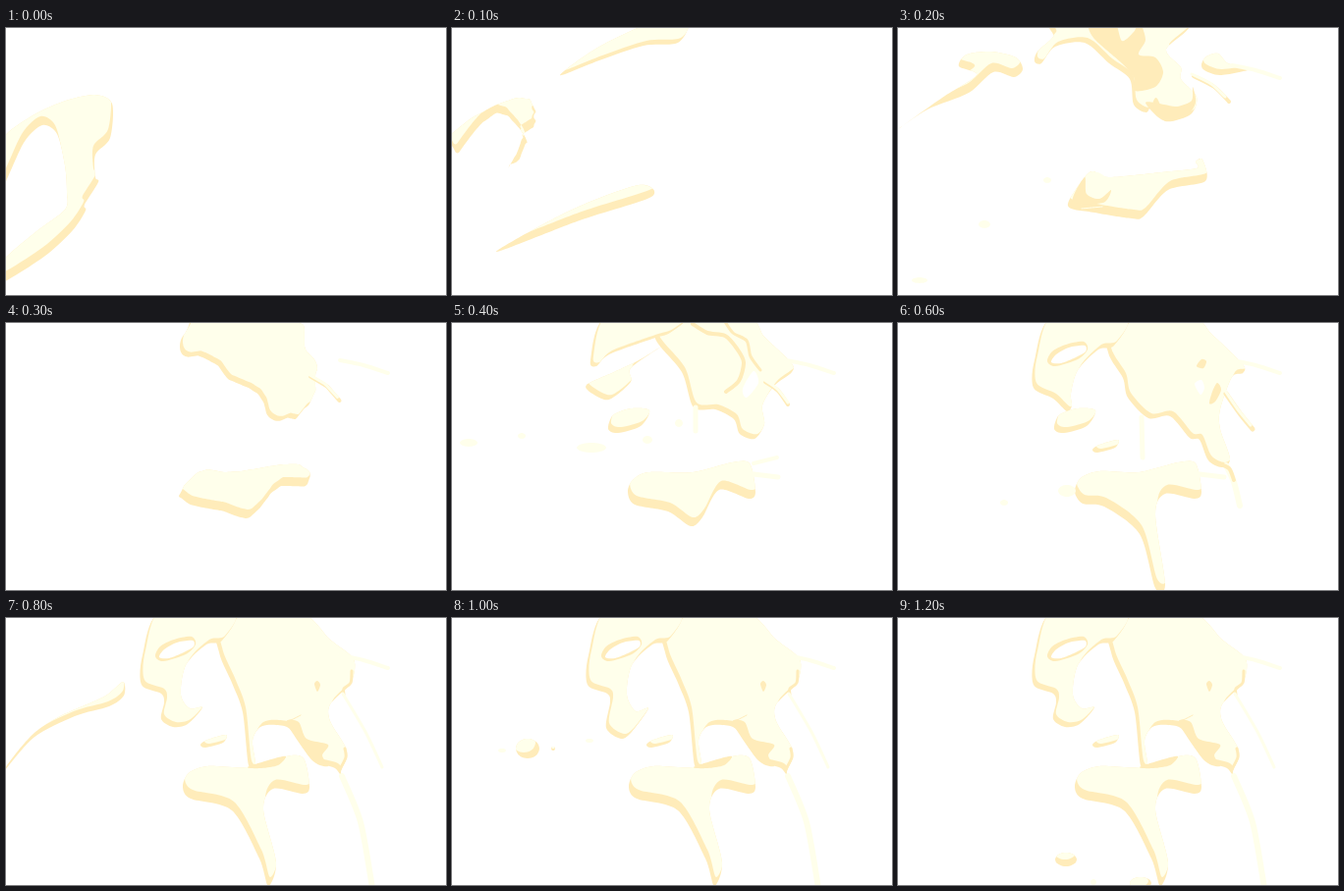
Write an HTML page that moves like this. It is 448 px wide and 272 px high and loops after 1300 ms.

```html
<!DOCTYPE html>
<html lang="en">
<head>
<meta charset="utf-8">
<title>Splash</title>
<style>
html, body { margin: 0; width: 100%; height: 100%; overflow: hidden; background: #fff; }
svg { display: block; width: 448px; height: 272px; }
</style>
</head>
<body>
<svg id="stage" viewBox="0 0 448 272"></svg>
<script>
const LOOP = 1300, STEP = 100, SAMPLES = 80;
const CREAM = "#ffffeb", SHADE = "#ffecba", WHITE = "#fff";
const parts = [];

// shift: cream laid over a shaded copy; width: an open line instead of a filled outline.
class Part {
  constructor(options) {
    Object.assign(this, { color: CREAM, until: LOOP, keys: [] }, options);
    parts.push(this);
  }
  pose(t, text) {
    const n = text.split(" ").map(Number);
    this.keys.push({ t, points: n.flatMap((x, i) => i % 2 ? [] : [[x, n[i + 1]]]) });
    return this;
  }
}
const liquid = (shift, until) => new Part({ shift, until: until || LOOP });
const patch = (color, until) => new Part({ color, until: until || LOOP });
const strand = (color, width, until) => new Part({ color, width, until: until || LOOP });

function drop(t, x, y, rx, ry, shift) {
  const ring = Array.from({ length: 10 }, (_, i) => i * Math.PI / 5)
    .map(a => `${x + rx * Math.cos(a)} ${y + ry * Math.sin(a)}`).join(" ");
  new Part({ until: t + STEP, shift }).pose(t, ring);
}

// First wave
liquid([-2, -9], 300)
  .pose(0, "-6 117 24 91 58 75 90 68 108 77 106 112 91 129 91 152 94 157 80 180 81 186 68 206 40 232 -6 260 -6 240 30 208 60 185 62 167 60 140 52 108 37 99 18 117 -6 166")
  .pose(200, "-4 106 45 71 80 48 62 39 70 27 95 24 120 30 127 42 118 50 97 45 72 66 30 83");

// Forehead, nose and right side
liquid([3, -5])
  .pose(100, "110 48 150 19 205 -6 240 -6 230 15 195 18 150 33")
  .pose(200, "163 -6 158 9 142 24 139 34 146 36 160 19 190 15 215 36 236 52 240 78 253 86 260 76 272 95 298 88 304 70 288 52 288 40 273 22 293 -6")
  .pose(400, "215 -6 207 16 234 50 246 86 268 88 287 98 293 113 308 118 318 103 316 84 328 64 346 50 345 40 318 14 300 -6")
  .pose(600, "215 -6 214 30 229 56 234 76 255 97 277 95 297 117 307 119 316 140 330 147 338 138 328 108 328 88 340 55 351 51 351 42 320 12 298 -6")
  .pose(800, "215 -6 217 35 230 66 241 96 247 150 254 149 251 125 259 111 275 109 290 114 312 145 335 153 345 168 341 157 347 142 345 130 330 105 330 88 351 66 354 42 330 22 298 -6");
patch(SHADE, 300).pose(200, "195 -6 199 10 228 36 240 50 241 64 262 60 270 45 262 30 245 27 252 12 246 -6 240 4 228 13 220 -6");
patch(SHADE, 300).pose(200, "270 94 293 90 303 76 300 60 299 74 284 80 271 78 252 76");
strand(SHADE, 4, 600).pose(400, "245 1 260 10 278 13 290 26 297 40 292 59 279 70");
strand(SHADE, 3, 600).pose(400, "277 -3 286 10 300 18 304 34 314 48");
patch(WHITE, 600).pose(400, "296 67 307 49 312 61 300 76");
patch(SHADE, 700).pose(600, "304 44 309 37 314 39 311 46");
patch(WHITE, 700).pose(600, "302 62 309 58 312 66 308 73");
patch(SHADE)
  .pose(600, "320 70 325 61 329 68 323 80 317 82")
  .pose(800, "314 67 317 64 320 68 317 75");
patch(SHADE).pose(800, "286 107 298 106 306 123 328 129 322 140 328 151 312 145");
strand(SHADE, 1).pose(800, "280 107 290 104 300 99");
strand(SHADE, 3).pose(800, "344 78 344 72 351 66 352 54");
strand(SHADE, 3).pose(800, "345 133 346 142 340 154");

// Eyelid and cheek
liquid([3, -4]).pose(400, "157 -6 141 38 147 44 160 32 204 16 222 10 235 -6");
liquid([3, -5])
  .pose(400, "137 63 165 50 190 38 213 24 182 46 182 60 160 78 143 72")
  .pose(600, "157 -6 139 38 138 66 158 77 172 90 177 84 176 72 183 48 204 27 220 23 232 -6")
  .pose(800, "157 -6 139 38 138 68 158 77 161 86 158 103 170 111 185 108 200 91 187 92 178 78 183 48 204 27 220 23 232 -6")
  .pose(1000, "157 -6 139 38 138 68 158 77 161 86 157 112 172 123 183 116 200 92 187 95 178 78 183 48 204 27 220 23 232 -6")
  .pose(1200, "157 -6 139 38 138 68 158 77 161 86 158 103 170 111 185 108 200 91 187 92 178 78 183 48 204 27 220 23 232 -6");
patch(SHADE).pose(600, "152 39 157 29 171 22 189 19 193 27 183 37 160 44");
patch(WHITE).pose(600, "156 40 161 32 174 25 190 23 191 29 181 35 166 41");
liquid([3, -6], 800).pose(400, "159 108 164 94 182 87 201 89 192 105 169 112");
liquid([4, -4]).pose(600, "198 129 205 124 224 119 221 127 203 132");

// Right brow and thin strands
liquid([2, -6], 300).pose(200, "309 37 314 29 326 26 336 36 358 42 328 48 312 43");
strand(CREAM, 4).pose(200, "340 38 364 43 389 51");
strand(SHADE, 4, 600).pose(200, "301 49 322 60 337 75").pose(400, "319 60 332 69 342 83");
strand(CREAM, 3, 600).pose(200, "299 47 319 57 333 70").pose(400, "318 58 331 67 342 81");
strand(SHADE, 5, 700).pose(600, "334 72 348 92 361 108");
strand(CREAM, 3).pose(600, "333 69 346 88 359 104").pose(800, "343 77 366 116 383 152");
strand(CREAM, 5, 700).pose(400, "248 86 248 110").pose(600, "248 96 249 137");
strand(CREAM, 6).pose(600, "334 145 342 162 348 186").pose(800, "342 161 361 208 373 275");
strand(SHADE, 4, 700).pose(600, "325 143 337 148 342 160");

// Lips
liquid([2, -9])
  .pose(100, "45 228 120 186 190 160 203 172 130 196")
  .pose(200, "173 181 190 152 199 146 215 152 268 147 304 143 303 136 310 134 313 156 275 165 250 192 238 194 200 188")
  .pose(400, "179 172 184 160 200 152 245 152 285 142 303 143 309 172 302 179 272 170 255 198 243 207 220 192 186 185")
  .pose(600, "180 172 186 158 205 151 245 152 285 142 303 143 309 172 302 179 272 174 262 195 272 266 262 270 246 215 210 187 188 184")
  .pose(800, "180 172 186 158 205 151 245 152 285 141 303 143 309 172 302 179 272 174 262 195 275 249 267 273 258 245 230 196 188 184");
patch(SHADE, 300).pose(200, "178 177 190 152 192 169 205 174 217 165 209 178");
patch(CREAM, 300).pose(200, "197 152 203 147 215 155 214 166 205 172 196 164");
strand(CREAM, 1, 300).pose(200, "187 184 208 182");
patch(SHADE).pose(800, "246 152 270 144 285 141 277 150 260 153");
strand(CREAM, 4, 600).pose(400, "307 143 331 137");
strand(CREAM, 5, 700).pose(400, "307 154 332 157");

// Second wave
liquid([-1, -5], 1000)
  .pose(700, "-6 160 18 126 45 104 46 114 14 143")
  .pose(800, "-6 161 10 138 30 116 55 100 100 80 119 65 120 79 105 90 70 100 28 122")
  .pose(900, "25 138 75 108 148 83 146 96 104 110 45 142");

// Flying drops
drop(200, 152, 155, 4, 3);
drop(200, 88, 200, 6, 4);
drop(200, 22, 257, 8, 3);
drop(400, 17, 122, 9, 4);
drop(400, 71, 115, 4, 3);
drop(400, 142, 127, 15, 5);
drop(400, 199, 119, 5, 4);
drop(400, 231, 102, 4, 4);
drop(600, 108, 183, 4, 3);
drop(600, 172, 171, 9, 6);
drop(1000, 51, 135, 4, 2);
drop(1000, 77, 133, 12, 10, [-4, -6]);
drop(1000, 103, 133, 2, 2, [0, -2]);
drop(1000, 140, 125, 4, 2);
drop(1100, 128, 190, 11, 8, [-2, -6]);
drop(1200, 171, 246, 11, 7, [-1, -7]);
drop(1200, 199, 269, 3, 3);
drop(1200, 247, 270, 11, 6, [-3, -2]);

const mix = (a, b, k) => a + (b - a) * k;

// Evenly spaced points let outlines with different point counts blend.
function resample(points, closed) {
  const ring = closed ? [...points, points[0]] : points;
  const lengths = ring.slice(1).map((p, i) => Math.hypot(p[0] - ring[i][0], p[1] - ring[i][1]));
  const total = lengths.reduce((a, b) => a + b, 0);
  let seg = 0, passed = 0;
  return Array.from({ length: SAMPLES }, (_, i) => {
    const goal = total * i / (closed ? SAMPLES : SAMPLES - 1);
    while (seg < lengths.length - 1 && passed + lengths[seg] < goal) passed += lengths[seg++];
    const k = (goal - passed) / lengths[seg];
    return [0, 1].map(c => mix(ring[seg][c], ring[seg + 1][c], k));
  });
}

function poseAt({ keys, width }, t) {
  const i = keys.findLastIndex(key => key.t <= t);
  const a = keys[i], b = keys[i + 1];
  if (!b || a.t === t) return a.points;
  const k = (t - a.t) / (b.t - a.t);
  const from = resample(a.points, !width), to = resample(b.points, !width);
  return from.map((p, j) => [mix(p[0], to[j][0], k), mix(p[1], to[j][1], k)]);
}

function smoothPath(points, closed) {
  const n = points.length;
  const at = i => closed ? points[(i + n) % n] : points[Math.max(0, Math.min(n - 1, i))];
  let d = `M${points[0]}`;
  for (let i = 0; i < (closed ? n : n - 1); i++) {
    const [p, q, r, s] = [at(i - 1), at(i), at(i + 1), at(i + 2)];
    const c1 = [0, 1].map(c => q[c] + (r[c] - p[c]) / 7);
    const c2 = [0, 1].map(c => r[c] - (s[c] - q[c]) / 7);
    d += `C${c1} ${c2} ${r}`;
  }
  return closed ? d + "Z" : d;
}

function markup(part, t, id) {
  const { color, width, shift } = part;
  const d = smoothPath(poseAt(part, t), !width);
  if (width) return `<path d="${d}" fill="none" stroke="${color}" stroke-width="${width}" stroke-linecap="round"/>`;
  if (!shift) return `<path d="${d}" fill="${color}"/>`;
  return `<clipPath id="c${id}"><path d="${d}"/></clipPath><path d="${d}" fill="${SHADE}"/>
    <g clip-path="url(#c${id})"><path d="${d}" fill="${color}" transform="translate(${shift})"/></g>`;
}

const stage = document.getElementById("stage");
const start = performance.now();
let shown = -1;
function tick() {
  const t = Math.floor((performance.now() - start) % LOOP / STEP) * STEP;
  if (t !== shown) {
    shown = t;
    stage.innerHTML = parts.filter(p => p.keys[0].t <= t && t < p.until)
      .map((p, i) => markup(p, t, i)).join("");
  }
  requestAnimationFrame(tick);
}
tick();
</script>
</body>
</html>
```
